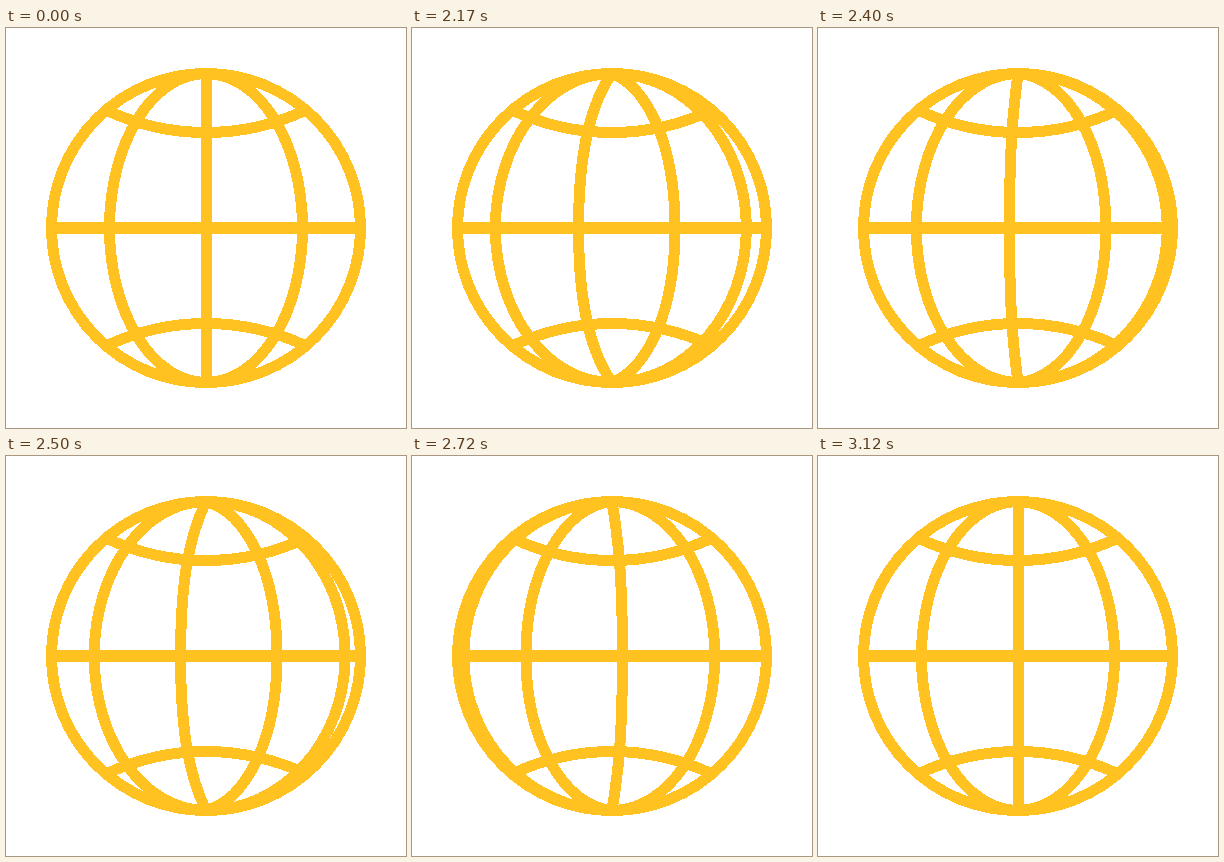
Recreate the animation shown at these times as an HTML page. Size 400 by 400 pixels, loop 3200 ms.

```html
<!DOCTYPE html>
<html lang="en">
<head>
<meta charset="utf-8">
<title>Spinning globe</title>
<style>
  html, body { margin: 0; width: 100%; height: 100%; overflow: hidden; background: #fff; }
  svg { display: block; width: 100vw; height: 100vh; }
  g { fill: none; stroke: #ffc220; stroke-width: 11; shape-rendering: crispEdges; }
  .equator { stroke-width: 12; }
</style>
</head>
<body>
<svg viewBox="0 0 400 400">
  <g transform="translate(200 200)">
    <circle r="154.5"/>
    <path class="equator" d="M-155 0H155"/>
    <path d="M-99 -117.5A234 234 0 0 0 99 -117.5M-99 117.5A234 234 0 0 1 99 117.5"/>
    <path id="meridians"/>
  </g>
</svg>
<script>
const LOOP = 3200, START = 2000, SPIN = 1125, TURNS = 7, STEP = 25;
const R = 154.5, INNER = 96.5, KAPPA = 0.5523, TIP = 40;
const meridians = document.getElementById('meridians');

const bezier = (a, b, s) => 3 * a * s * (1 - s) ** 2 + 3 * b * s * s * (1 - s) + s ** 3;

// Constant-speed start, soft landing
function ease(x) {
  if (x <= 0) return 0;
  if (x >= 1) return 1;
  let lo = 0, hi = 1;
  for (let i = 0; i < 30; i++) {
    const mid = (lo + hi) / 2;
    if (bezier(0.167, 0.455, mid) < x) lo = mid; else hi = mid;
  }
  return bezier(0.167, 1, lo);
}

// pos: 0 is the straight middle line, -2 and 2 lie on the rim
function meridian(pos) {
  const a = Math.abs(pos);
  const w = Math.sign(pos) * (a < 1 ? a * INNER : INNER + (a - 1) * (R - INNER));
  const tip = R - Math.max(0, 1 - a) * TIP;
  const cx = w * KAPPA, cy = R * KAPPA;
  return `M0 ${-R}C${cx} ${-tip} ${w} ${-cy} ${w} 0S${cx} ${tip} 0 ${R}`;
}

// 40 steps per second, alternately 20 and 30 ms long
function snap(t) {
  return Math.floor(t / 50) * 50 + (t % 50 >= 20 ? STEP : 0);
}

function draw(now) {
  const t = snap(now % LOOP);
  const shift = TURNS * ease((t - START) / SPIN) % 1;
  // New lines enter from the rim once the spin is one step old
  const lines = t > START + STEP ? [-2, -1, 0, 1] : [-1, 0, 1];
  meridians.setAttribute('d', lines.map(i => meridian(i + shift)).join(''));
  requestAnimationFrame(draw);
}
draw(performance.now());
</script>
</body>
</html>
```
